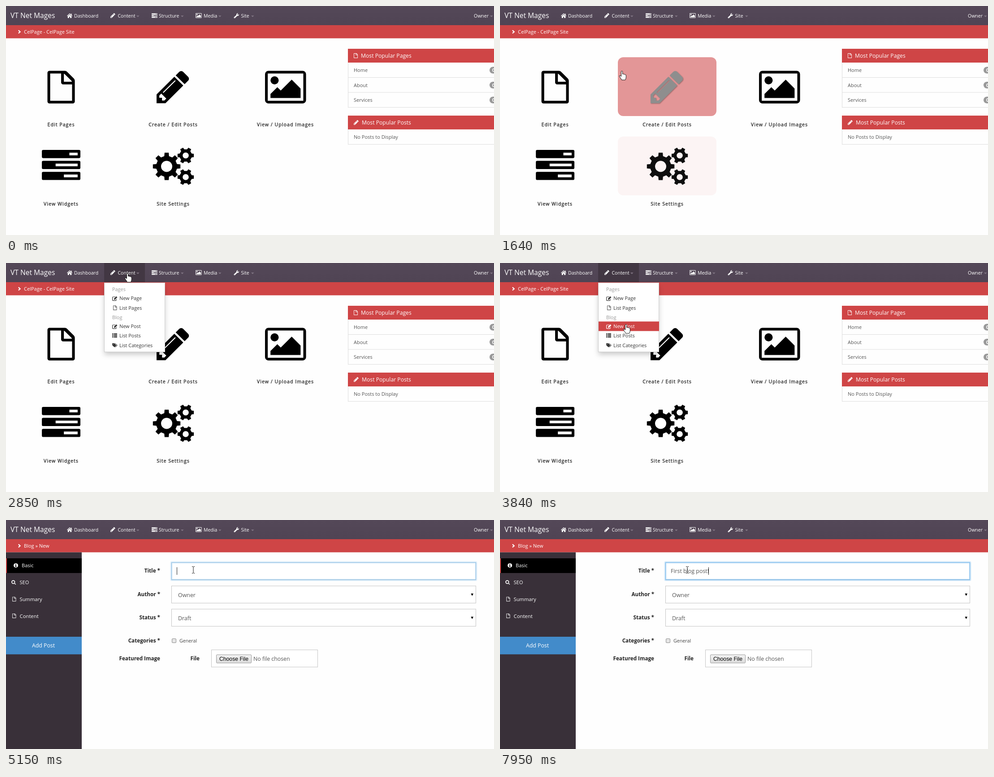
These frames come from a looping animation (1089x514 px, 8 s). An HTML page:

```html
<!DOCTYPE html>
<html lang="en">
<head>
<meta charset="utf-8">
<title>Blog editor</title>
<style>
html, body { margin: 0; width: 100%; height: 100%; overflow: hidden; background: #fefefe; }
svg { display: block; fill: currentColor; font-family: "Open Sans", sans-serif; }
text { white-space: pre; }
path { fill-rule: evenodd; }
.box { fill: #fff; stroke: #c4c4c4; }
.label { font-weight: 700; font-size: 11.7px; text-anchor: end; color: #222; }
.caption { letter-spacing: 1px; text-anchor: middle; stroke: currentColor; stroke-width: .3; color: #222; }
</style>
</head>
<body>
<svg id="stage" width="1089" height="514" viewBox="0 0 1089 514"></svg>
<script>
const RED = '#cf4546', LOOP = 8000;
const TITLE = 'First blog post!';
const KEY_TIMES = [6250, 6370, 6490, 6550, 6610, 6730, 6970, 7040, 7220, 7280, 7400, 7460, 7520, 7640, 7700, 7950];

// Icon outlines
const bar = (y, x) => `M64 ${y}H1728a64 64 0 0 1 64 64v256a64 64 0 0 1-64 64H64a64 64 0 0 1-64-64v-256a64 64 0 0 1 64-64ZM${x} ${y + 128}H1664v128H${x}Z`;
const disc = (x, y, r) => `M${x - r} ${y}a${r} ${r} 0 1 0 ${2 * r} 0a${r} ${r} 0 1 0 ${-2 * r} 0Z`;
function gear(cx, cy, r, teeth, hole) {
  const pts = [], step = 2 * Math.PI / teeth;
  for (let i = 0; i < teeth; i++)
    for (const [off, rad] of [[-.29, .76], [-.19, 1], [.19, 1], [.29, .76]]) {
      const a = (i + off) * step;
      pts.push((cx + r * rad * Math.cos(a)).toFixed(1) + ' ' + (cy + r * rad * Math.sin(a)).toFixed(1));
    }
  return `M${pts.join('L')}Z` + disc(cx, cy, hole);
}
const icons = {
  file: 'M0 96A96 96 0 0 1 96 0H816q60 0 110 50L1230 354q50 50 50 110V1440a96 96 0 0 1-96 96H96a96 96 0 0 1-96-96ZM128 128V1408H1152V640H736a96 96 0 0 1-96-96V128ZM768 136V512H1144q-8-30-24-46L814 160q-16-16-46-24Z',
  pencil: 'M363 1387l91-91-235-235-91 91v107h128v128h107zM886 459q0-22-22-22-10 0-17 7l-542 542q-7 7-7 17 0 22 22 22 10 0 17-7l542-542q7-7 7-17zM832 267l416 416-832 832h-416v-416zM1515 363q0 53-37 90l-166 166-416-416 166-165q36-38 90-38 53 0 91 38l235 234q37 39 37 91z',
  picture: 'M160 0H1760a160 160 0 0 1 160 160V1376a160 160 0 0 1-160 160H160a160 160 0 0 1-160-160V160A160 160 0 0 1 160 0ZM128 128V1408H1792V128ZM256 1280V1088L576 768 736 928 1248 416 1664 832V1280Z' + disc(448, 448, 192),
  tasks: bar(0, 1280) + bar(512, 640) + bar(1024, 1024),
  gears: gear(31, 42, 31, 8, 12.5) + gear(73.5, 17.5, 18.5, 6, 6.8) + gear(73.5, 66, 18.5, 6, 6.8),
  home: 'M0 6L6 .5 8.8 3V1.2h1.7v3.3L12 6 11.2 6.9 6 2.3.8 6.9ZM1.8 7L6 3.4 10.2 7V11H7.2V8H4.8V11H1.8Z',
  wrench: 'M6.2 4.2A3.4 3.4 0 0 1 10.4.2L8.4 1.6V3L9.7 3.8 12 2.6A3.4 3.4 0 0 1 7.9 6.2L3 11.2Q1.8 12 .8 11.1 0 10.1.9 9Z' + disc(2, 10, .5),
  chevron: 'M1.6 0L6.2 4.2 1.6 8.4 0 6.9 3 4.2 0 1.5Z',
  edit: 'M7 1.5V2.6H2Q1.2 2.6 1.2 3.4V9Q1.2 9.8 2 9.8H7.6Q8.4 9.8 8.4 9V7.4L9.6 6.3V9Q9.6 11 7.6 11H2Q0 11 0 9V3.4Q0 1.5 2 1.5ZM4 8.2V6L9.2.8 11.4 3 6.2 8.2Z',
  list: [0, 3.4, 6.8].map(y => `M0 ${y}h2.6v2.4H0ZM3.6 ${y}H11v2.4H3.6Z`).join(''),
  tags: 'M0 .5H4.6L9.4 5.3 5 9.8 0 4.8ZM6 .5H7L11.8 5.3 7.3 9.8 6.6 9.1 10.4 5.3Z' + disc(2, 2.5, .8),
  info: disc(5, 5, 5) + 'M4 1.6H6V3.2H4ZM3.5 4.2H6V7.6H6.8V8.6H3.4V7.6H4.1V5.2H3.5Z',
  search: disc(4.2, 4.2, 4.2) + disc(4.2, 4.2, 2.5) + 'M6.4 7.5L7.5 6.4 10.3 9.2 9.2 10.3Z'
};

// Markup helpers
const text = (x, y, s, size = 11, attr = '') => `<text x="${x}" y="${y}" font-size="${size}" ${attr}>${s}</text>`;
const rect = (x, y, w, h, fill, attr = '') => `<rect x="${x}" y="${y}" width="${w}" height="${h}" fill="${fill}" ${attr}/>`;
const box = (x, y, w, h) => `<rect class="box" x="${x}" y="${y}" width="${w}" height="${h}"/>`;
const icon = (name, x, y, k = 1) => `<g transform="translate(${x} ${y}) scale(${k})"><path d="${icons[name]}"/></g>`;
const group = (id, color, body) => `<g id="${id}" color="${color}">${body}</g>`;
const caret = x => `<path d="M${x} 21.5h6.6l-3.3 3.3Z" fill="#837886"/>`;
const SMALL = .0071, LARGE = .0477;

const nav = rect(0, 0, 1089, 43, 'url(#navFill)') + rect(219, 0, 91, 43, '#423743', 'id="navHover"') +
  group('nav', '#fff',
    text(10, 27, 'VT Net Mages', 15.6) +
    icon('home', 136, 16) + icon('pencil', 233, 16, SMALL) + icon('tasks', 325, 16.5, SMALL) +
    icon('picture', 423, 16, SMALL) + icon('wrench', 508, 16) +
    [['Dashboard', 152], ['Content', 249.5], ['Structure', 341], ['Media', 441], ['Site', 524.5], ['Owner', 1044]]
      .map(([s, x]) => text(x, 25.5, s, 10.5)).join('') +
    [291, 390, 474, 547, 1080].map(caret).join(''));

const crumbs = rect(0, 43, 1089, 29.5, RED) +
  group('crumbs', '#fff', icon('chevron', 27, 53.7) + text(40, 61.5, '', 11, 'id="crumb"'));

const tile = (id, x, y, art) => rect(x, y, 220, 132, RED, `id="${id}Back" rx="12" opacity="0"`) + group(id, '#000', art);
const panel = (y, title, head, rows) => {
  const lines = rows.map((_, i) => `M763 ${y + 64.5 + i * 33.5}H1089`).join('');
  return `<path d="M763.5 ${y}V${y + 31 + rows.length * 33.5}${lines}" fill="none" stroke="#ddd"/>` +
    rect(763, y, 326, 31, RED) + `<g color="#fff">${head}${title}</g>` +
    rows.map((s, i) => text(776, y + 52 + i * 33.5, s, 11, 'color="#555"')).join('');
};
const dash = group('dash', '#000',
  icon('file', 92.5, 145.5, LARGE) + icon('picture', 578, 145.5, LARGE) + icon('tasks', 80, 323, .048) +
  tile('posts', 263, 115, icon('pencil', 336, 146, LARGE)) +
  tile('settings', 263, 293, icon('gears', 327.5, 318)) +
  [['Edit Pages', 123, 270], ['Create / Edit Posts', 373, 270], ['View / Upload Images', 623.5, 270],
   ['View Widgets', 123, 448], ['Site Settings', 373, 448]]
    .map(([s, x, y]) => text(x, y, s, 10.7, 'class="caption"')).join('') +
  panel(96, text(792, 115.5, 'Most Popular Pages', 12.2), icon('file', 776, 106, SMALL), ['Home', 'About', 'Services']) +
  panel(246, text(794, 265.5, 'Most Popular Posts', 12.2), icon('pencil', 776, 256, SMALL), ['No Posts to Display']) +
  [144, 177.5, 211].map(y => rect(1079, y - 7.5, 24, 15, '#999', 'rx="7.5"') + text(1085, y + 4, '0', 10.5, 'color="#fff" font-weight="700"')).join(''));

const select = (y, s) => box(369.5, y, 679, 38.5) + text(384, y + 24.5, s, 12.4, 'color="#555"') +
  `<path d="M1037.5 ${y + 17}h5.5l-2.75 5.5Z" fill="#000"/>`;
const form = group('form', '#fff',
  rect(0, 72.5, 169, 442, '#393039') + rect(0, 86, 169, 33, '#000') + rect(0, 86, 2, 33, RED) + rect(0, 262, 169, 39.5, '#428bca') +
  icon('info', 17, 97) + icon('search', 12, 135) + icon('file', 14, 172.5, .0066) + icon('file', 14, 210, .0066) +
  text(35, 106, 'Basic') + text(30.5, 144, 'SEO') + text(30.5, 181.5, 'Summary', 11.2) + text(30.5, 219.5, 'Content', 11.3) +
  text(83.5, 286, 'Add Post', 12.3, 'text-anchor="middle"') +
  [['Title *', 118], ['Author *', 170.5], ['Status *', 223], ['Categories *', 275], ['Featured Image', 314.5]]
    .map(([s, y]) => text(344, y, s, 11.7, 'class="label"')).join('') + text(432, 314.5, 'File', 11.7, 'class="label"') +
  box(369.5, 95.5, 679, 38.5) +
  `<g id="focus" fill="none" stroke="#66afe9"><rect x="369" y="95" width="680" height="39.5" rx="1" stroke-width="5" opacity=".28"/><rect x="369.5" y="95.5" width="679" height="38.5"/></g>` +
  text(381, 119, '', 12.4, 'id="typed" color="#555"') + rect(0, 106, 1, 17, '#222', 'id="caret"') +
  select(148, 'Owner') + select(200, 'Draft') +
  rect(370.5, 266.5, 9, 9, '#e6e6e6', 'rx="1.5" stroke="#8a8a8a"') + text(387, 275, 'General', 10.7, 'color="#444"') +
  box(458.5, 291.5, 237, 38.5) + rect(469.5, 302.5, 78, 18.5, 'url(#buttonFill)', 'rx="1.5" stroke="#999"') +
  text(476, 316, 'Choose File', 12.2, 'color="#000" font-family="Liberation Sans, Arial, sans-serif"') +
  text(552, 316, 'No file chosen', 12.3, 'color="#555"'));

const ROWS = [['New Page', 'edit', 79], ['List Pages', 'file', 100.5], ['New Post', 'edit', 142], ['List Posts', 'list', 163], ['List Categories', 'tags', 184.5]];
const menu = group('menu', '#333',
  rect(219.5, 44.5, 135, 155, '#fff', 'filter="url(#shadow)"') + rect(219.5, 44.5, 135, 155, 'none', 'stroke="#ccc"') +
  rect(220, 0, 135, 21.4, RED, 'id="rowHover"') +
  text(237, 63, 'Pages', 10.9, 'color="#999"') + text(237, 125.5, 'Blog', 10.9, 'color="#999"') +
  ROWS.map(([s, name, y]) => `<g class="row">${name === 'file' ? icon(name, 239, y - 5, .0066) : icon(name, 237, y - 5)}${text(253, y + 4, s, 10.9)}</g>`).join(''));

const pointers = [
  ['arrow', 'M0 0V15L3.5 12 6 17.5 8.4 16.5 6 11.2H10.6Z', '#fff'],
  ['hand', 'M-1.6 1.6a1.6 1.6 0 0 1 3.2 0V6.8q2-1 3 .6q2-.8 2.8.7q1.9-.2 1.9 2V14q0 3-1.8 6H-.5Q-2 16.3-5.6 12q-.6-2.2 1.5-1.8L-1.6 12Z', '#fff'],
  ['beam', 'M-3-7.5H-1L0-6.5 1-7.5H3M0-6.5V6.5M-3 7.5H-1L0 6.5 1 7.5H3', 'none']
].map(([id, d, fill]) => `<path id="${id}" d="${d}" fill="${fill}" stroke="#111" stroke-linejoin="round"/>`).join('');

const stage = document.getElementById('stage');
stage.innerHTML = `<defs>
  <linearGradient id="navFill" x2="0" y2="1"><stop stop-color="#544858"/><stop offset="1" stop-color="#504454"/></linearGradient>
  <linearGradient id="buttonFill" x2="0" y2="1"><stop stop-color="#f3f3f3"/><stop offset="1" stop-color="#dcdcdc"/></linearGradient>
  <filter id="shadow" x="-30%" y="-30%" width="160%" height="160%"><feDropShadow dx="0" dy="6" stdDeviation="6" flood-opacity=".2"/></filter>
  </defs>` + nav + crumbs + dash + form + menu + `<g id="pointer">${pointers}</g>`;

const $ = id => document.getElementById(id);
const show = (id, on) => { $(id).style.display = on ? '' : 'none'; };
const clamp = v => Math.min(1, Math.max(0, v));

// cubic-bezier(.25, .1, .25, 1)
function ease(x) {
  if (x <= 0 || x >= 1) return clamp(x);
  const curve = (s, a, b) => 3 * a * s * (1 - s) ** 2 + 3 * b * s * s * (1 - s) + s ** 3;
  let lo = 0, hi = 1;
  for (let i = 0; i < 20; i++) {
    const mid = (lo + hi) / 2;
    if (curve(mid, .25, .25) < x) lo = mid; else hi = mid;
  }
  return curve(lo, .1, 1);
}

// Half-second hover transition that reverses on leaving
function hover(t, enter, leave) {
  if (t < leave) return ease((t - enter) / 500);
  const peak = ease((leave - enter) / 500);
  return peak * (1 - ease((t - leave) / (500 * peak)));
}

function paintTile(id, p) {
  const v = Math.round(255 * p);
  $(id + 'Back').setAttribute('opacity', p);
  $(id).style.color = `rgb(${v},${v},${v})`;
  $(id).style.filter = p > 0 ? `drop-shadow(1px 1px 1px rgba(0,0,0,${p * .6}))` : 'none';
}

// Pointer path: time, x, y
const PATH = [[960, 276, 508], [1225, 276, 425], [1390, 274, 313], [1480, 273, 247], [1690, 272, 115], [1760, 272, 84],
  [1810, 272, 69], [2050, 271, 23], [2850, 271, 23], [3540, 279, 133], [3660, 281, 138], [4320, 281, 137], [4910, 418, 112]];
function pointerAt(t) {
  const i = PATH.findIndex(k => k[0] > t);
  if (i < 0) return PATH[PATH.length - 1].slice(1);
  if (i === 0) return PATH[0].slice(1);
  const [t0, x0, y0] = PATH[i - 1], [t1, x1, y1] = PATH[i];
  let k = (t - t0) / (t1 - t0);
  if (t0 >= 2850) k = k * k * (3 - 2 * k);
  return [x0 + (x1 - x0) * k, y0 + (y1 - y0) * k];
}

function render(t) {
  const editing = t >= 4200, open = t >= 2490 && t < 3900;
  const [x, y] = pointerAt(t);
  show('dash', !editing);
  show('form', editing);
  show('menu', open);
  show('navHover', open);
  $('crumb').textContent = editing ? 'Blog » New' : 'CelPage - CelPage Site';

  paintTile('settings', hover(t, 1225, 1422));
  paintTile('posts', t < 3000 ? hover(t, 1480, 1690) : hover(Math.min(t, 4010), 3900, LOOP));

  const active = ROWS.findIndex(r => Math.abs(y - r[2]) <= 10.7);
  show('rowHover', active >= 0);
  if (active >= 0) $('rowHover').setAttribute('y', ROWS[active][2] - 10.7);
  document.querySelectorAll('.row').forEach((r, i) => { r.style.color = i === active ? '#fff' : ''; });

  const onTile = (y > 115 && y < 247) || (y > 293 && y < 425);
  const onLink = y < 43 || (open ? active >= 0 : onTile);
  const kind = editing ? (x > 369 ? 'beam' : 'arrow') : onLink ? 'hand' : 'arrow';
  show('pointer', t >= 960);
  for (const id of ['arrow', 'hand', 'beam']) show(id, id === kind);
  $('pointer').setAttribute('transform', `translate(${Math.round(x)} ${Math.round(y)})`);

  if (!editing) return;
  const count = KEY_TIMES.filter(k => k <= t).length;
  $('typed').textContent = TITLE.slice(0, count);
  $('focus').setAttribute('opacity', clamp((t - 5040) / 160));
  show('caret', t >= 5090 && !(t >= 5630 && t < 6120));
  $('caret').setAttribute('x', Math.round(381 + (count ? $('typed').getSubStringLength(0, count) : 0) - .5));
}

function tick() {
  render(performance.now() % LOOP);
  requestAnimationFrame(tick);
}
tick();
</script>
</body>
</html>
```
